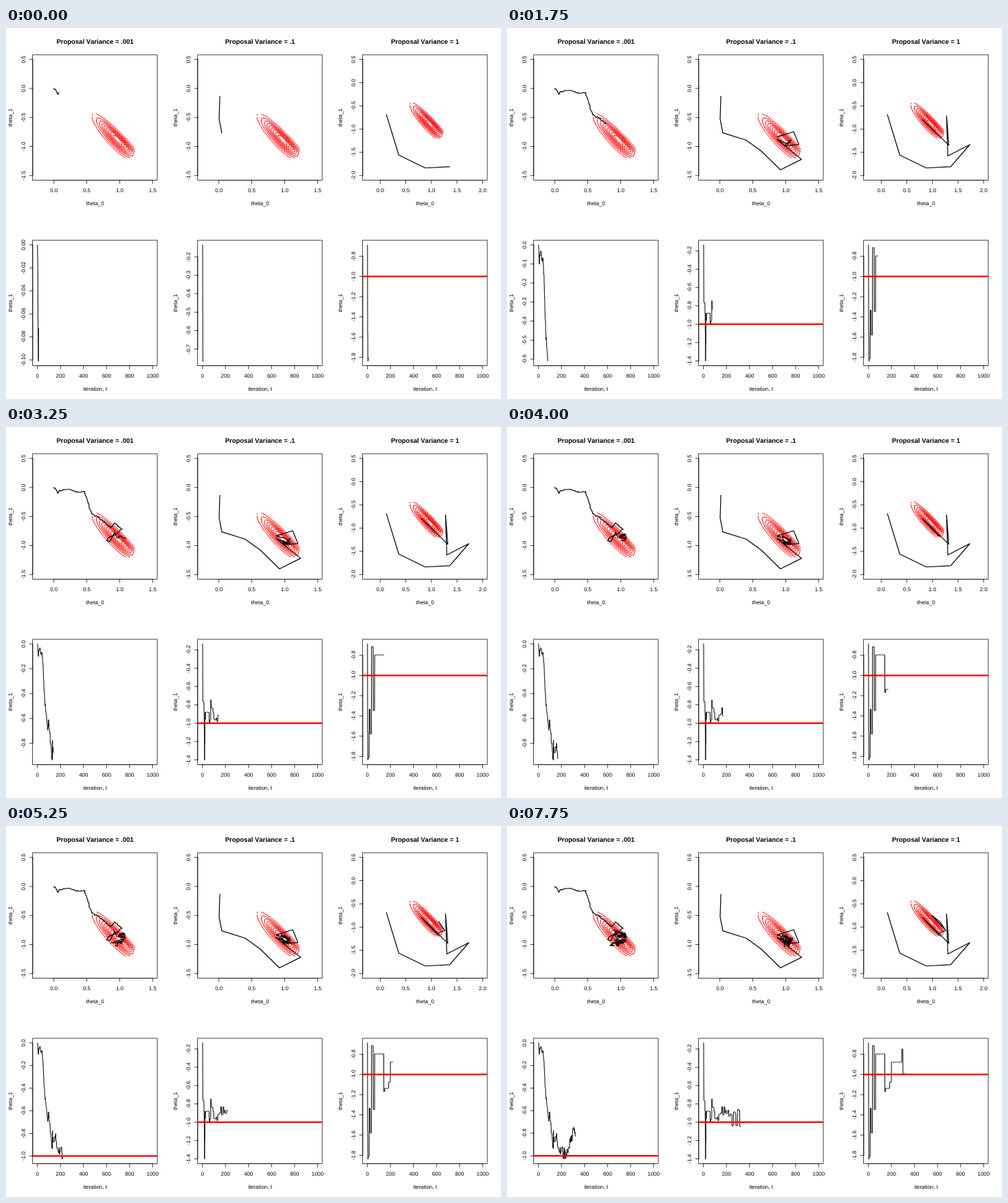
An HTML page for the animation above (8 s loop, 720 by 540 pixels).

```html
<!DOCTYPE html>
<html>
<head>
<meta charset="utf-8">
<style>
html, body { margin: 0; width: 100%; height: 100%; overflow: hidden; background: #fff; }
svg { display: block; }
text { font: 7.92px "Liberation Sans", Arial, sans-serif; text-anchor: middle; text-rendering: geometricPrecision; }
.title { font-size: 9.5px; font-weight: bold; font-kerning: none; }
path { fill: none; stroke: #000; stroke-width: .75; stroke-linecap: round; stroke-linejoin: round; }
.walk { stroke-width: 1.2; }
.trace { stroke-width: 1; }
.contour { stroke: #f00; stroke-width: .9; }
.mean { stroke: #f00; stroke-width: 2.4; stroke-linecap: butt; }
</style>
</head>
<body>
<svg width="720" height="540" viewBox="0 0 720 540">
  <g id="fixed"></g>
  <g id="live"></g>
</svg>
<script>
const STEP = 250, LOOP = 8000, TOTAL = 320, LINE = 9.504;
const BOX = { left: 38.97, top: 38.97, width: 181.07, height: 182.56 };

let seed = 11;
const noise = () => {
  seed = (seed * 1664525 + 1013904223) % 4294967296;
  return seed / 2147483648 - 1;
};

const state = (t, a, b) => ({ t, a: a / 100, b: b / 100 });

// Key points: iteration, then theta_0 and theta_1 in hundredths.
const smallKeys = [
  [1, 0, 0], [4, 3, -3.2], [8, 6.2, -10.1], [12, 9, -5.2], [23, 25, -3.8],
  [30, 35, -8.2], [40, 47, -7], [50, 50.5, -20.8], [57, 53.6, -35.5],
  [63, 58, -46], [70, 67, -51], [80, 78, -61], [90, 86, -69.5],
  [96, 92, -61], [108, 104, -72.2], [124, 81, -92], [127, 85, -93.5], [131, 92, -77.5]
].map(k => state(...k));

const mediumKeys = [
  [1, 1.5, -13.5], [3, .4, -52.5], [4, 4.5, -76.5], [14, 40, -89], [16, 63, -108],
  [18, 92, -140.2], [20, 124, -122], [22, 87, -88], [24, 104, -96], [27, 108, -88],
  [59, 98, -99], [66, 120, -96.5], [73, 112, -74.5], [76, 87, -83.5]
].map(k => state(...k));

const largeKeys = [
  [1, 12.1, -68.8], [2, 36.2, -156], [4, 88, -183.7], [7, 135.6, -181], [16, 173, -133.4],
  [24, 130, -157.9], [36, 127.5, -71.5], [51, 132, -134.8], [63, 80.5, -79.7],
  [143, 112.8, -117], [150, 110, -113.8], [185, 126.2, -107.6], [200, 114, -87.8],
  [290, 99, -74.9], [300, 119.5, -99.5]
].map(k => state(...k));

// One state per iteration; each key is held until the next.
function hold(keys) {
  const out = [];
  for (let t = 1, k = 0; t <= TOTAL; t++) {
    if (keys[k + 1] && keys[k + 1].t <= t) k++;
    out.push(keys[k]);
  }
  return out;
}

// Medium steps: after the approach, jump about the mode at random intervals.
function jumps() {
  const keys = mediumKeys.slice();
  for (let t = 92; t < TOTAL; t += Math.round(10 + 6 * noise()))
    keys.push(state(t, 102 + 10 * noise(), -95 + 12 * noise()));
  return hold(keys);
}

// Small steps: jitter along the approach, then a slow drift around the mode.
function wander() {
  const out = [smallKeys[0]];
  let floor = 0, k = 0, da = 0, db = 0;
  for (let t = 2; t <= TOTAL; t++) {
    if (smallKeys[k + 1] && smallKeys[k + 1].t <= t) k++;
    const p = smallKeys[k], q = smallKeys[k + 1];
    if (p.t === t) {
      out.push(p);
    } else if (noise() > 0) {
      out.push(out[t - 2]);
    } else if (q) {
      const f = (t - p.t) / (q.t - p.t), amp = t < 108 ? .011 : .04;
      floor = Math.min(floor, p.b, q.b);
      out.push({
        a: p.a + (q.a - p.a) * f + amp * noise(),
        b: Math.min(0, Math.max(floor, p.b + (q.b - p.b) * f + amp * noise()))
      });
    } else {
      const drift = -.93 + .08 * Math.cos(2 * Math.PI * (t - 135) / 170);
      da = .75 * da + .07 * noise();
      db = Math.max(-.025, .75 * db + .045 * noise());
      out.push({ a: .99 + da, b: drift + db });
    }
  }
  return out;
}

const pad = (lo, hi) => [lo - .04 * (hi - lo), hi + .04 * (hi - lo)];

function ticks([lo, hi]) {
  const cell = (hi - lo) / 5, base = 10 ** Math.floor(Math.log10(cell));
  let unit = base;
  for (const [m, h] of [[2, .8], [5, 1.7], [10, .8]]) {
    if (m * base - cell < h * (cell - unit)) unit = m * base;
    else break;
  }
  const digits = Math.max(0, -Math.floor(Math.log10(unit) + 1e-9)), out = [];
  for (let i = Math.ceil(lo / unit - 1e-9); i * unit <= hi + 1e-9; i++)
    out.push({ v: i * unit, label: (i * unit || 0).toFixed(digits) });
  return out;
}

function frame(col, row, xr, yr) {
  const l = col * 240 + BOX.left, t = row * 270 + BOX.top;
  return {
    l, t, r: l + BOX.width, b: t + BOX.height, xr, yr,
    x: v => l + BOX.width * (v - xr[0]) / (xr[1] - xr[0]),
    y: v => t + BOX.height * (yr[1] - v) / (yr[1] - yr[0])
  };
}

const path = (d, cls = "") => `<path class="${cls}" d="${d}"/>`;
const text = (x, y, s, cls = "") => `<text class="${cls}" x="${x}" y="${y}">${s}</text>`;
const upright = (x, y, s) => `<text transform="translate(${x} ${y}) rotate(-90)">${s}</text>`;
const line = pts => "M" + pts.map(p => p[0].toFixed(2) + " " + p[1].toFixed(2)).join("L");

function xAxis(f, name) {
  const ts = ticks(f.xr), end = f.b + LINE / 2;
  let d = `M${f.x(ts[0].v)} ${f.b}H${f.x(ts[ts.length - 1].v)}`, s = "";
  for (const { v, label } of ts) {
    d += `M${f.x(v)} ${f.b}V${end}`;
    s += text(f.x(v), f.b + 1.8 * LINE, label);
  }
  return path(d) + s + text((f.l + f.r) / 2, f.b + 3.8 * LINE, name);
}

function yAxis(f) {
  const ts = ticks(f.yr), end = f.l - LINE / 2;
  let d = `M${f.l} ${f.y(ts[0].v)}V${f.y(ts[ts.length - 1].v)}`, s = "";
  for (const { v, label } of ts) {
    d += `M${f.l} ${f.y(v)}H${end}`;
    s += upright(f.l - 1.2 * LINE, f.y(v), label);
  }
  return path(d) + s;
}

const border = f =>
  path(`M${f.l} ${f.t}H${f.r}V${f.b}H${f.l}Z`) +
  upright(f.l - 3.2 * LINE, (f.t + f.b) / 2, "theta_1");

// Skewed bell along a falling diagonal.
function density(a, b) {
  const x = (a - .98) * 95.85, y = -(b + .89) * 84.5, c = Math.cos(.8), s = Math.sin(.8);
  const u = x * c + y * s, v = x * s - y * c;
  return Math.exp(-((u / (u < 0 ? 25 : 20)) ** 2 + (v / (v < 0 ? 6.2 : 4.4)) ** 2) / 2);
}

function contours(f) {
  const N = 20, a = i => .58 + .645 * i / N, b = j => -1.197 + .757 * j / N;
  let d = "";
  for (let level = .1; level < .95; level += .1)
    for (let i = 0; i < N; i++)
      for (let j = 0; j < N; j++) {
        const c = [[i, j], [i + 1, j], [i + 1, j + 1], [i, j + 1]]
          .map(([m, n]) => ({ a: a(m), b: b(n), z: density(a(m), b(n)) - level }));
        const hits = [];
        c.forEach((p, k) => {
          const q = c[(k + 1) % 4];
          if (p.z * q.z >= 0) return;
          const w = p.z / (p.z - q.z);
          hits.push([f.x(p.a + (q.a - p.a) * w), f.y(p.b + (q.b - p.b) * w)]);
        });
        for (let k = 0; k + 1 < hits.length; k += 2) d += line([hits[k], hits[k + 1]]);
      }
  return path(d, "contour");
}

const plots = [
  { title: ".001", chain: wander(), xr: pad(-.25, 1.5), yr: pad(-1.5, .5) },
  { title: ".1", chain: jumps(), xr: pad(-.25, 1.5), yr: pad(-1.5, .5) },
  { title: "1", chain: hold(largeKeys), xr: pad(-.25, 2), yr: pad(-2, .5) }
];
const iterations = pad(0, 1000);

document.getElementById("fixed").innerHTML = plots.map((p, col) => {
  p.map = frame(col, 0, p.xr, p.yr);
  const low = frame(col, 1, iterations, [0, 1]), mid = (low.l + low.r) / 2;
  return text(mid, 22.9, "Proposal Variance = " + p.title, "title") +
    border(p.map) + xAxis(p.map, "theta_0") + yAxis(p.map) + contours(p.map) +
    border(low) + xAxis(low, "iteration, t");
}).join("");

function draw(n) {
  return plots.map((p, col) => {
    const states = p.chain.slice(0, n), bs = states.map(s => s.b);
    const f = frame(col, 1, iterations, pad(Math.min(...bs), Math.max(...bs)));
    const walk = line(states.map(s => [p.map.x(s.a), p.map.y(s.b)]));
    const trace = line(bs.map((b, i) => [f.x(i + 1), f.y(b)]));
    const mean = f.yr[0] < -1 && f.yr[1] > -1 ? path(`M${f.l} ${f.y(-1)}H${f.r}`, "mean") : "";
    return path(walk, "walk") + yAxis(f) + path(trace, "trace") + mean;
  }).join("");
}

const live = document.getElementById("live");
let shown = -1;
function tick() {
  const step = Math.floor(performance.now() % LOOP / STEP);
  if (step !== shown) {
    shown = step;
    live.innerHTML = draw(10 * (step + 1));
  }
  requestAnimationFrame(tick);
}
tick();
</script>
</body>
</html>
```
